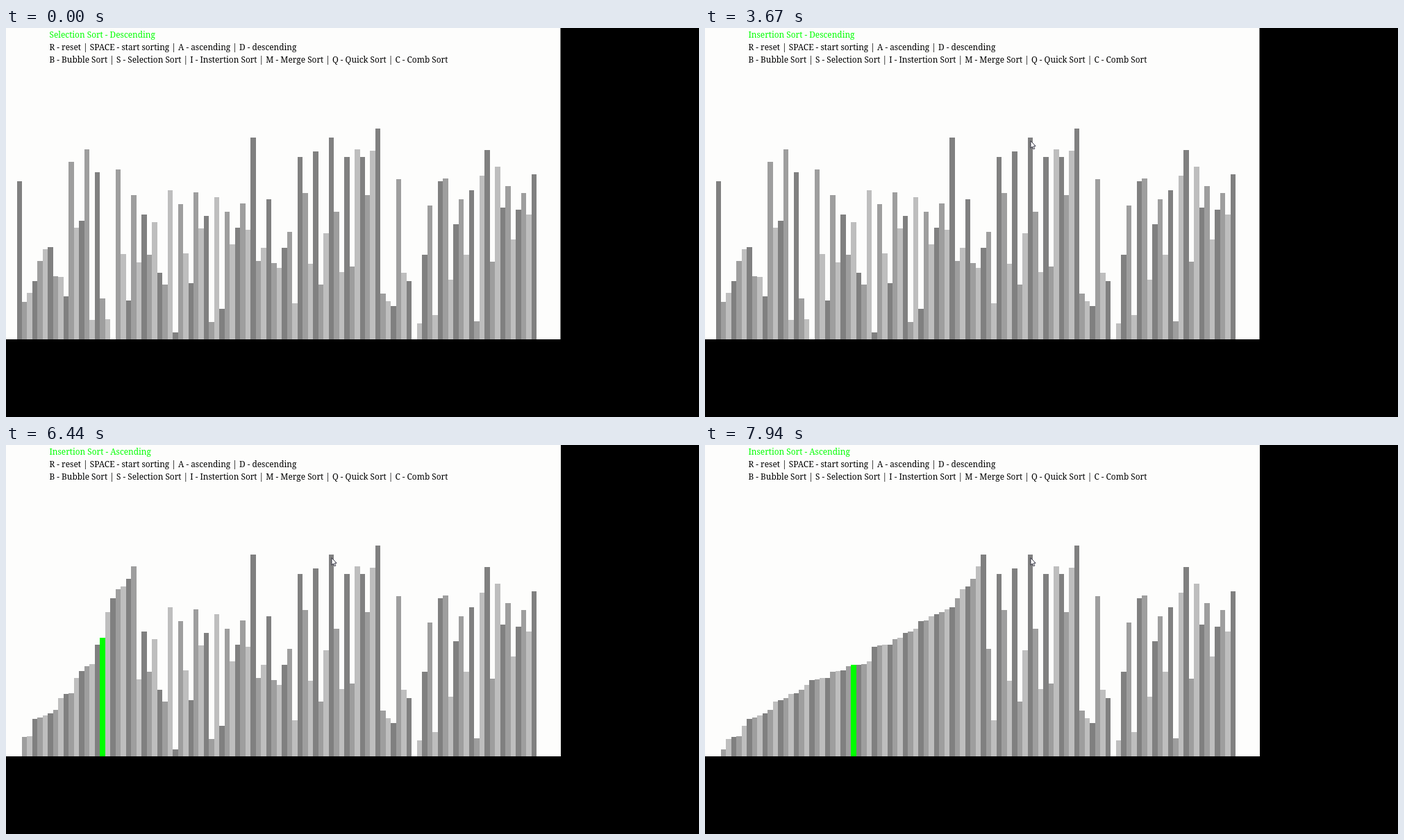
These frames come from a looping animation (998x561 px, 8 s). An HTML page with a canvas:

```html
<!DOCTYPE html>
<html lang="en">
<head>
<meta charset="utf-8">
<title>Sorting bars</title>
<style>
  html, body { margin: 0; width: 100%; height: 100%; overflow: hidden; background: #000; }
  #stage { position: relative; width: 998px; height: 561px; overflow: hidden; background: #000; }
  canvas, svg { position: absolute; left: 0; top: 0; }
  p {
    position: absolute; left: 62.5px; margin: 0; white-space: pre; color: #000;
    font: 11.87px/18px "Noto Serif", serif;
  }
  #title { top: 0; color: #0f0; }
  #keys { top: 17.5px; }
  #sorts { top: 36px; }
</style>
</head>
<body>
<div id="stage">
  <canvas id="chart" width="998" height="561"></canvas>
  <p id="title">Selection Sort - Descending</p>
  <p id="keys">R - reset | SPACE - start sorting | A - ascending | D - descending</p>
  <p id="sorts">B - Bubble Sort | S - Selection Sort | I - Instertion Sort | M - Merge Sort | Q - Quick Sort | C - Comb Sort</p>
  <svg id="pointer" width="12" height="16">
    <path d="M1 .8V11.2L3.4 9L5.1 12.8L6.8 12L5.2 8.3H8.1Z" fill="#fff" stroke="#223" stroke-width=".9"/>
  </svg>
</div>
<script>
const LOOP = 8000, BASE = 449, LEFT = 15.5, PITCH = 7.485;
const SHADES = ['#808080', '#9e9e9e', '#bebebe'];
const SORT_START = 5327, SORT_STEP = 50.3;

// Top edge of each bar before sorting
const tops = [
  221, 395, 382, 365, 336, 319, 316, 358, 359, 387, 193, 288, 278, 175, 421, 208, 390, 420, 449, 204,
  326, 393, 241, 338, 269, 327, 280, 353, 370, 234, 439, 254, 325, 368, 237, 289, 271, 424, 244, 405,
  265, 312, 288, 253, 291, 158, 336, 317, 247, 339, 346, 317, 294, 397, 186, 238, 340, 178, 370, 296,
  158, 265, 352, 186, 344, 175, 186, 241, 177, 145, 383, 394, 401, 218, 353, 365, 449, 426, 327, 256,
  414, 221, 217, 363, 283, 247, 327, 234, 423, 213, 176, 337, 200, 259, 228, 305, 262, 238, 269, 211
];

const $ = id => document.getElementById(id);
const ctx = $('chart').getContext('2d');
const edge = i => Math.round(LEFT + i * PITCH);

// Insertion sort after `steps` outer passes; `mark` is where the last scan stopped
function sortedState(steps) {
  const bars = tops.slice();
  let mark = -1;
  for (let i = 1; i <= steps; i++) {
    const key = bars[i];
    let j = i - 1;
    while (j >= 0 && bars[j] < key) bars[j + 1] = bars[j--];
    bars[j + 1] = key;
    mark = j;
  }
  return { bars, mark };
}

function drawChart(steps) {
  const { bars, mark } = sortedState(steps);
  ctx.fillStyle = '#fdfdfc';
  ctx.fillRect(0, 0, 798.5, BASE);
  bars.forEach((top, i) => {
    ctx.fillStyle = i === mark ? '#0f0' : SHADES[i % 3];
    ctx.fillRect(edge(i), top, edge(i + 1) - edge(i), BASE - top);
  });
}

function titleAt(t) {
  const name = t < 2900 ? 'Selection' : 'Insertion';
  return `${name} Sort - ${t < 4600 ? 'Descending' : 'Ascending'}`;
}

function movePointer(t) {
  const p = Math.min(1, Math.max(0, (t - 400) / 500));
  const rest = (1 - p) ** 2;
  $('pointer').style.visibility = p > 0 ? 'visible' : 'hidden';
  $('pointer').style.transform = `translate(${468 + 265 * rest}px, ${162 + 272 * rest}px)`;
}

let lastSteps = -1;
function render(now) {
  const t = now % LOOP;
  const steps = Math.max(0, Math.floor((t - SORT_START) / SORT_STEP));
  if (steps !== lastSteps) drawChart(lastSteps = steps);
  const title = titleAt(t);
  if ($('title').textContent !== title) $('title').textContent = title;
  movePointer(t);
  requestAnimationFrame(render);
}
render(performance.now());
</script>
</body>
</html>
```
